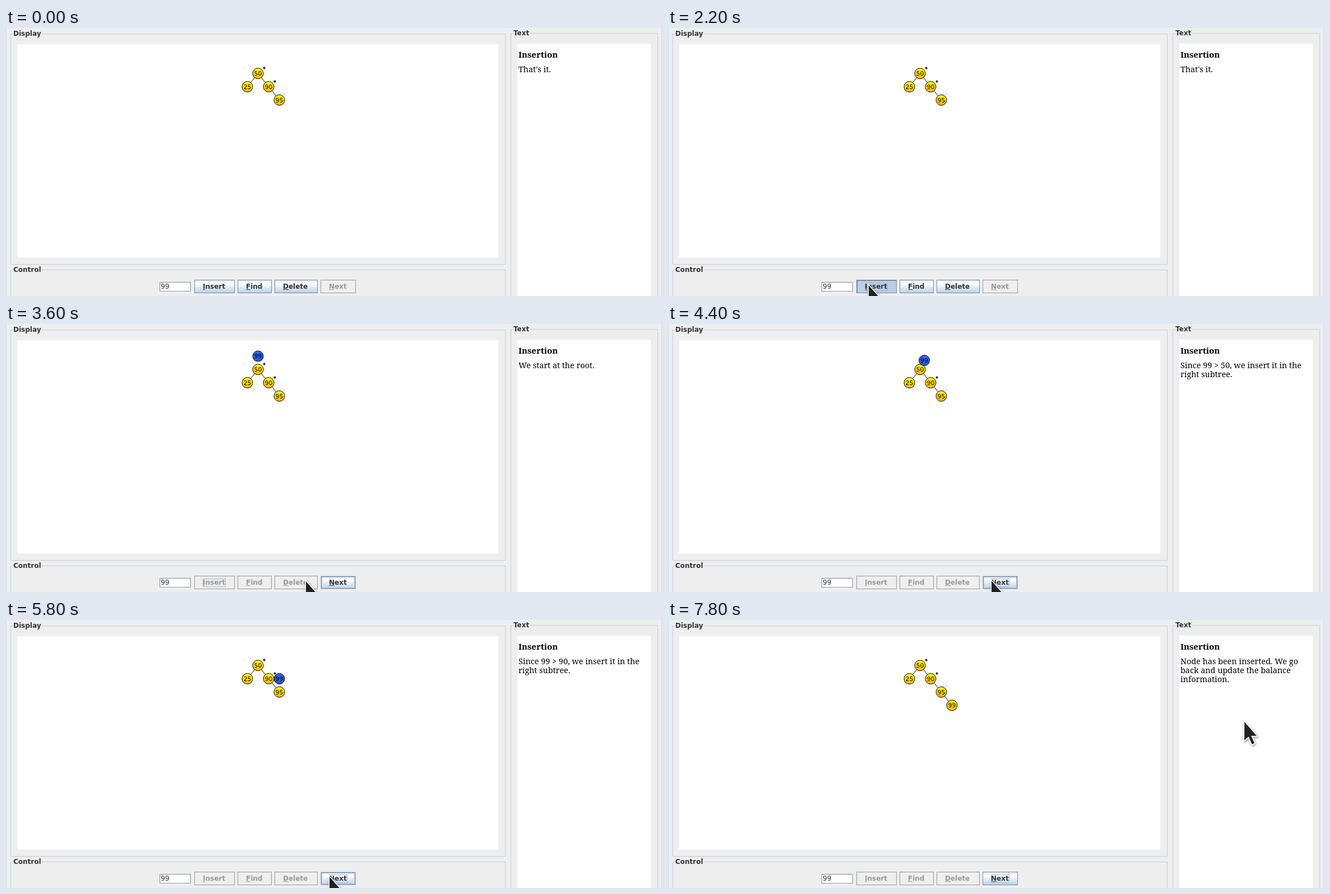
These frames come from a looping animation (1170 by 479 pixels, 8000 ms). An HTML page with a canvas:

```html
<!DOCTYPE html>
<html lang="en">
<head>
<meta charset="utf-8">
<title>Tree insertion</title>
<style>
  html, body { margin: 0; width: 100%; height: 100%; overflow: hidden; background: #eee; }
  canvas { display: block; }
</style>
</head>
<body>
<canvas id="stage" width="1170" height="479"></canvas>
<script>
const ctx = document.getElementById('stage').getContext('2d');
const W = 1170, H = 479, LOOP = 8000, TICK = 100;
const SANS = '"DejaVu Sans", sans-serif';
const BOLD = 'bold 12px ' + SANS;
const SERIF = '"Noto Serif", serif';
const LINE = '#b8cfe5', DARK = '#7a8a99', INK = '#333', GREY = '#999';

// Moments of the mouse presses and releases
const PRESS = [2200, 4100, 5100, 6300];
const RELEASE = [2400, 4200, 5300, 6400];

// Pointer tip: [time, x, y], each held until the next
const POINTER = [
  [1100, 374, 476], [1200, 366, 469], [1300, 360, 463], [1400, 358, 460],
  [3300, 412, 463], [3400, 505, 463], [3600, 535, 460], [3700, 562, 460],
  [3800, 577, 459], [7600, 640, 431], [7700, 900, 257], [7800, 1028, 182]
];

// Tree positions are in layout units around the spot above the root
const ZOOM = 0.95, ORIGIN = { x: 449.5, y: 57.5 };
const TREE = [
  { key: 50, u: 0, v: 25, mark: '+' },
  { key: 25, u: -20, v: 50, mark: '' },
  { key: 90, u: 20, v: 50, mark: '+' },
  { key: 95, u: 40, v: 75, mark: '.' }
];
const STOPS = [[-463, -40], [0, 0], [20, 25], [40, 50], [60, 100]];

const MESSAGES = [
  ["That's it."],
  ['We start at the root.'],
  ['Since 99 > 50, we insert it in the', 'right subtree.'],
  ['Since 99 > 90, we insert it in the', 'right subtree.'],
  ['Node has been inserted. We go', 'back and update the balance', 'information.']
];

function rect(x, y, w, h, color) {
  ctx.fillStyle = color;
  ctx.fillRect(x, y, w, h);
}

function frame(x, y, w, h, color) {
  ctx.strokeStyle = color;
  ctx.lineWidth = 1;
  ctx.strokeRect(x + 0.5, y + 0.5, w - 1, h - 1);
}

function text(str, x, y, font, color, align = 'left') {
  ctx.font = font;
  ctx.fillStyle = color;
  ctx.textAlign = align;
  ctx.fillText(str, x, y);
}

function group(title, x, y, w, h, gap) {
  frame(x, y, w, h, LINE);
  rect(x + 4, y, gap, 1, '#eee');
  text(title, x + 5, y + 4, BOLD, INK);
}

function button(label, x, w, { enabled, hover, pressed, focus }) {
  const y = 450, h = 24;
  if (enabled) {
    const g = ctx.createLinearGradient(0, y, 0, y + h);
    g.addColorStop(0, '#dde8f3');
    g.addColorStop(0.3, '#fff');
    g.addColorStop(0.6, '#dde8f3');
    g.addColorStop(1, LINE);
    rect(x, y, w, h, pressed ? LINE : g);
  }
  if (enabled && hover && !pressed) {
    frame(x, y, w, h, LINE);
    frame(x + 2, y + 2, w - 4, h - 4, LINE);
    frame(x + 1, y + 1, w - 2, h - 2, DARK);
  } else {
    frame(x, y, w, h, enabled ? DARK : GREY);
    if (pressed) {
      rect(x, y, w, 2, DARK);
      rect(x, y, 2, h, DARK);
    }
  }
  const color = enabled ? INK : GREY;
  text(label, x + 15, 466, BOLD, color);
  const tw = ctx.measureText(label).width;
  rect(x + 15, 467, Math.round(ctx.measureText(label[0]).width), 1, color);
  if (focus) frame(x + 15, 455, Math.round(tw) + 1, 15, '#a3b8cc');
}

function place({ u, v }) {
  return { x: ORIGIN.x + u * ZOOM, y: ORIGIN.y + v * ZOOM };
}

function node(n, fresh) {
  const { x, y } = place(n);
  const g = ctx.createLinearGradient(0, y - 10, 0, y + 10);
  g.addColorStop(0, fresh ? '#3366ff' : '#ffff00');
  g.addColorStop(1, fresh ? '#2a58d8' : '#ffb000');
  ctx.beginPath();
  ctx.arc(x, y, 10 * ZOOM, 0, Math.PI * 2);
  ctx.fillStyle = g;
  ctx.fill();
  ctx.strokeStyle = '#000';
  ctx.lineWidth = 1;
  ctx.stroke();
  text(n.key, x, Math.round(y + 3.9), '11px ' + SANS, '#000', 'center');

  const mx = Math.floor(x) + 11, my = Math.round(y) - 10;
  if (n.mark === '+') {
    rect(mx - 2, my, 5, 1, '#000');
    rect(mx, my - 2, 1, 5, '#000');
    rect(mx - 1, my - 1, 3, 3, 'rgba(0,0,0,.45)');
  } else if (n.mark === '.') {
    rect(mx - 2, my - 2, 1, 1, '#555');
  }
}

function edge(from, to) {
  const a = place(from), b = place(to);
  ctx.beginPath();
  ctx.moveTo(a.x, a.y);
  ctx.lineTo(b.x, b.y);
  ctx.strokeStyle = '#000';
  ctx.lineWidth = 1;
  ctx.stroke();
}

// Whole-unit travel: the rest of the way is shared out over the remaining steps
function travel(from, to, steps) {
  let pos = from;
  for (let i = 0; i < steps; i++) pos += Math.trunc((to - pos) / (10 - i));
  return pos;
}

function newNode(t, stage) {
  const age = (t - RELEASE[stage - 1]) / TICK;
  const steps = Math.min(10, stage === 1 ? Math.floor(1 + age * 2.25) : age * 2);
  const [a, b] = [STOPS[stage - 1], STOPS[stage]];
  return {
    key: 99,
    u: travel(a[0], b[0], steps),
    v: travel(a[1], b[1], steps),
    mark: stage === 4 ? '.' : ''
  };
}

function drawTree(t, stage) {
  const [root, left, right, leaf] = TREE;
  const fresh = stage ? newNode(t, stage) : null;
  const linked = stage === 4;
  ctx.save();
  ctx.beginPath();
  ctx.rect(20, 29, 858, 381);
  ctx.clip();
  edge(root, left);
  edge(root, right);
  edge(right, leaf);
  if (linked) edge(leaf, fresh);
  TREE.forEach(n => node(n, false));
  if (fresh) node(fresh, !linked);
  ctx.restore();
}

function drawPointer(t) {
  const at = POINTER.filter(p => p[0] <= t).pop();
  if (!at) return;
  ctx.save();
  ctx.translate(at[1], at[2]);
  ctx.beginPath();
  [[0, 0], [0, 33], [7.5, 26.5], [13.5, 40], [18, 38], [12, 25], [22, 25]]
    .forEach(([x, y]) => ctx.lineTo(x, y));
  ctx.closePath();
  ctx.lineJoin = 'miter';
  ctx.shadowColor = 'rgba(0,0,0,.45)';
  ctx.shadowBlur = 4;
  ctx.shadowOffsetX = 1;
  ctx.shadowOffsetY = 2;
  ctx.strokeStyle = '#fff';
  ctx.lineWidth = 3;
  ctx.stroke();
  ctx.shadowColor = 'transparent';
  ctx.fillStyle = '#222';
  ctx.fill();
  ctx.restore();
}

function draw(t) {
  const stage = RELEASE.filter(r => r <= t).length;
  const down = PRESS.filter(p => p <= t).length > stage;
  const idle = stage === 0;

  rect(0, 0, W, H, '#eee');
  rect(0, 0, 1, H, '#ccdbe9');
  rect(W - 1, 0, 1, H, '#ccdbe9');
  group('Display', 8, 10, 883, 413, 51);
  group('Control', 8, 432, 883, 80, 52);
  group('Text', 900, 9, 263, 500, 31);
  rect(20, 29, 858, 381, '#fff');
  rect(912, 28, 238, H, '#fff');

  drawTree(t, stage);

  text('Insertion', 914, 53, 'bold 15px ' + SERIF, '#000');
  MESSAGES[stage].forEach((s, i) => text(s, 914, 79 + i * 16, '14.4px ' + SERIF, '#000'));

  rect(274, 454, 57, 18, '#fff');
  frame(274, 454, 56, 17, DARK);
  text('99', 276, 466, '12px ' + SANS, INK);

  button('Insert', 336, 72, {
    enabled: idle, hover: t >= 1200, pressed: idle && down, focus: t >= 2200 && t < 4100
  });
  button('Find', 413, 61, { enabled: idle });
  button('Delete', 479, 77, { enabled: idle });
  button('Next', 561, 63, {
    enabled: !idle, hover: t >= 3600 && t < 7600, pressed: !idle && down, focus: t >= 4100
  });

  drawPointer(t);
}

function loop() {
  const t = performance.now() % LOOP;
  draw(Math.floor(t / TICK) * TICK);
  requestAnimationFrame(loop);
}
loop();
</script>
</body>
</html>
```
